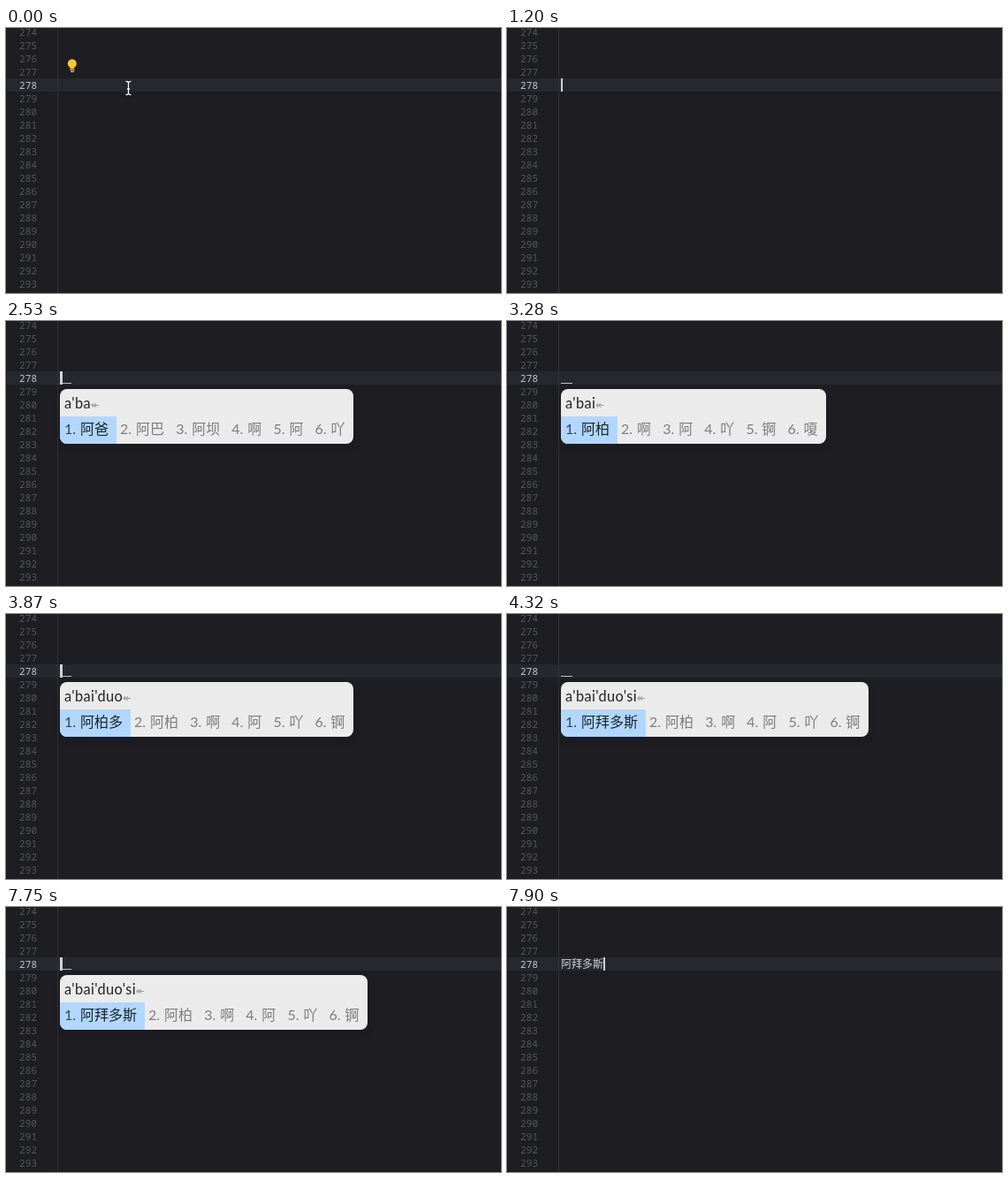
Recreate the animation shown at these times as an HTML page. Size 560x300 px, loop 8 s.

```html
<!DOCTYPE html>
<html lang="zh-CN">
<head>
<meta charset="utf-8">
<title>Pinyin input</title>
<style>
html, body { margin: 0; width: 100%; height: 100%; overflow: hidden; background: #1e1e22; }
#stage { position: relative; width: 560px; height: 300px; overflow: hidden; background: #1e1e22;
  font: 12px/15px "Noto Sans Mono", "Noto Sans CJK SC", monospace; }
#stage > * { position: absolute; }
#line { left: 1px; top: 57px; width: 559px; height: 15px; background: #25292f; }
#rule { left: 58px; top: 0; width: 1px; height: 300px; background: #313338; }
#gutter { left: 15px; top: -3px; font-size: 11px; letter-spacing: .2px; color: #51565d; }
#gutter .now { color: #c6c6c8; }
#typed { left: 61px; top: 57px; white-space: pre; color: #d3d0d8; }
#caret { top: 57px; width: 2px; height: 15px; background: #d2d2d6; }
#under { left: 61px; top: 70px; width: 13px; height: 1px; background: #b9bbbf; }
#icons { left: 0; top: 0; }
#popup { left: 61px; top: 77px; height: 62px; border-radius: 8px; overflow: hidden;
  background: #ebebeb; color: #7d7d7d; box-shadow: 0 4px 10px rgba(0, 0, 0, .12);
  font: 16px/28px Lato, "Noto Sans CJK SC", sans-serif; white-space: nowrap; }
#pinyin { height: 31px; padding-left: 5px; font-size: 16.4px; letter-spacing: .02em; line-height: 31px; color: #222; }
#pinyin i { font: 12px/1 "DejaVu Sans", sans-serif; letter-spacing: 0; color: #999; }
#choices { display: flex; height: 31px; }
#choices div { flex: none; box-sizing: border-box; padding-left: 5px; }
#choices b { display: inline-block; width: 18px; font-weight: 400; }
#choices div:first-child { background: #b2d7ff; color: #1a232c; font-weight: 500; padding-right: .5px; margin-right: -.5px; }
#choices div:first-child b { color: #35424f; }
[hidden] { display: none !important; }
</style>
</head>
<body>
<div id="stage">
  <div id="line"></div>
  <div id="rule"></div>
  <div id="gutter"></div>
  <div id="typed"></div>
  <div id="under"></div>
  <div id="caret"></div>
  <svg id="icons" width="560" height="300" fill="none">
    <defs>
      <path id="beam" d="M135.5 60.5h1.5l1.5 1 1.5-1h1.5M138.5 61.5v13M135.5 75.5h1.5l1.5-1 1.5 1h1.5M137 69h3"/>
    </defs>
    <path d="M72.3 46.2V44.6a5 5 0 1 1 5 0V46.2Z" fill="#ffc732"/>
    <path d="M72.5 47.5h5M73 49.5h4" stroke="#dcdcdc"/>
    <use href="#beam" stroke="#000" stroke-width="3"/>
    <use href="#beam" stroke="#fff" stroke-width="1.5"/>
  </svg>
  <div id="popup"><div id="pinyin"></div><div id="choices"></div></div>
</div>
<script>
const LOOP = 8000;
const $ = id => document.getElementById(id);

// [start, committed text, pinyin, candidates]
const steps = [
  [0, ""],
  [450, "a"],
  [1200, ""],
  [1940, "", "a", "啊 阿 吖 锕 嗄 呵"],
  [2240, "", "a'b", "阿爸 阿伯 阿宝 阿布 阿斌 阿彪"],
  [2530, "", "a'ba", "阿爸 阿巴 阿坝 啊 阿 吖"],
  [2830, "", "a'bai", "阿柏 啊 阿 吖 锕 嗄"],
  [3580, "", "a'bai'd", "阿柏的 阿柏大 阿柏 阿白 阿百 阿拜"],
  [3720, "", "a'bai'du", "啊拜读 阿柏 啊 阿 吖 锕"],
  [3870, "", "a'bai'duo", "阿柏多 阿柏 啊 阿 吖 锕"],
  [4170, "", "a'bai'duo's", "阿拜多斯 阿柏多少 阿柏多 阿柏 啊 阿"],
  [4320, "", "a'bai'duo'si", "阿拜多斯 阿柏 啊 阿 吖 锕"],
  [7900, "阿拜多斯"]
];

// [start, caret x], 0 = hidden
const carets = [
  [0, 0], [300, 61], [450, 68], [1200, 61], [3280, 0], [3870, 61], [4320, 0], [4770, 61],
  [5370, 0], [5820, 61], [6260, 0], [6860, 61], [7310, 0], [7750, 61], [7900, 109]
];

for (let n = 274; n <= 293; n++) {
  const row = $("gutter").appendChild(document.createElement("div"));
  row.textContent = n;
  if (n === 278) row.className = "now";
}

const at = (list, t) => list.findLast(entry => entry[0] <= t);

function showStep([start, text, pinyin, candidates]) {
  $("icons").style.display = start === 0 ? "" : "none";
  $("typed").textContent = text;
  $("popup").hidden = $("under").hidden = !pinyin;
  if (!pinyin) return;
  const words = candidates.split(" ");
  $("popup").style.width = 188 + 16 * words.join("").length + "px";
  $("pinyin").innerHTML = pinyin + "<i>↞</i>";
  $("choices").innerHTML = words.map((word, i) => {
    const width = 31.1 + 16 * word.length + (i ? 0 : .5);
    return `<div style="width:${width}px"><b>${i + 1}.</b>${word}</div>`;
  }).join("");
}

function showCaret(x, composing) {
  $("caret").hidden = !x;
  $("caret").style.left = x + "px";
  $("caret").style.width = composing ? "3px" : "2px";
}

let shown;
const origin = performance.now();
function draw() {
  const t = (performance.now() - origin) % LOOP;
  const step = at(steps, t);
  if (step !== shown) showStep(shown = step);
  showCaret(at(carets, t)[1], step[2]);
  requestAnimationFrame(draw);
}
draw();
</script>
</body>
</html>
```
